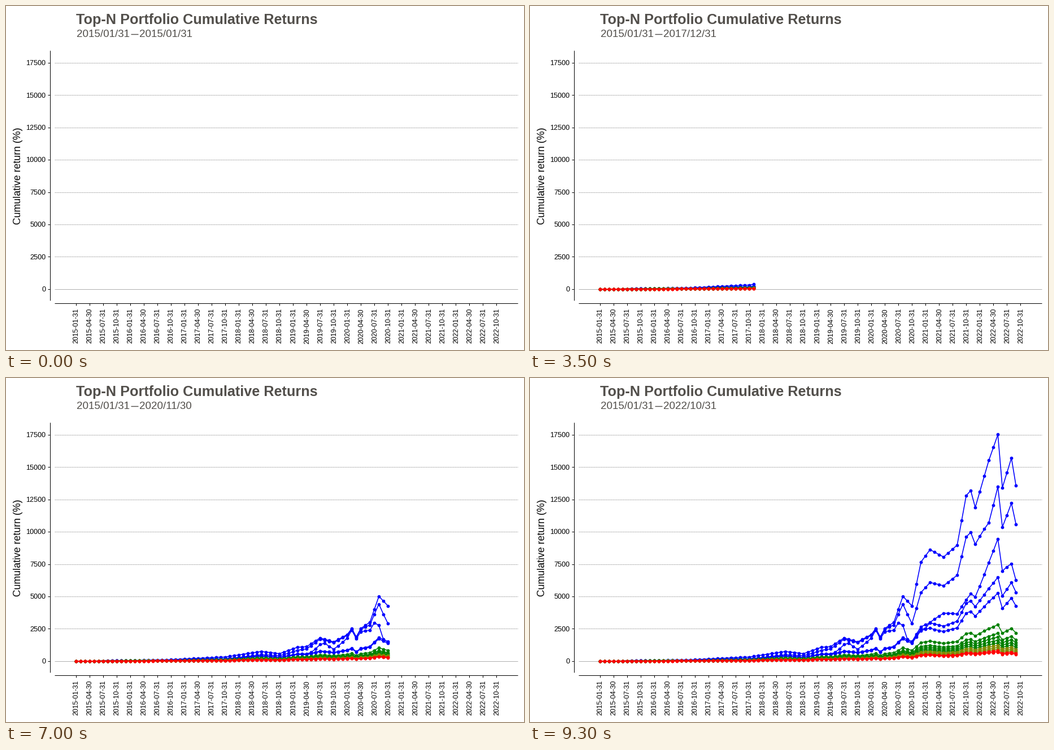
These frames come from a looping animation (917 px wide and 611 px high, 9.4 s). A matplotlib script:

```python
import numpy as np
import matplotlib.pyplot as plt
from matplotlib.animation import FuncAnimation

W, H, DPI = 917, 611, 64
PT = 72 / DPI  # points per pixel
MONTHS = 94
ZERO_Y = 502.75
UNIT = 57.4 / 2500  # pixels per percent
GREY = "#524f4b"

plt.rcParams["font.family"] = "Liberation Sans"

fig = plt.figure(figsize=(W / DPI, H / DPI), dpi=DPI, facecolor="white")
ax = fig.add_axes([0, 0, 1, 1])
ax.set_xlim(0, W)
ax.set_ylim(H, 0)
ax.axis("off")


def month_x(k):
    return 123.8 + 8.005 * k


def value_y(percent):
    return ZERO_Y - percent * UNIT


def month_end(k, sep):
    year, month = 2015 + k // 12, k % 12 + 1
    if month == 2:
        day = 29 if year % 4 == 0 else 28
    else:
        day = 30 if month in (4, 6, 9, 11) else 31
    return f"{year}{sep}{month:02d}{sep}{day}"


def stroke(x, y, color="black", width=1.0, **kw):
    return ax.plot(x, y, color=color, lw=width * PT,
                   solid_capstyle="butt", dash_capstyle="butt", **kw)[0]


def label(x, y, s, size, **kw):
    return ax.text(x, y, s, fontsize=size * PT, va="baseline",
                   rotation_mode="anchor", **kw)


def draw_axes():
    stroke([78, 78], [79, 523])
    stroke([86, 906], [528, 528])
    for value in range(0, 17501, 2500):
        y = value_y(value)
        style = {"dashes": (2, 1)} if value else {}
        stroke([86, 906], [y, y], "#a6a6a6" if value else "#b0b0b0", zorder=1, **style)
        stroke([74, 78], [y, y])
        label(70.3, y + 4.3, str(value), 12.6, ha="right")
    for k in range(0, MONTHS, 3):
        x = month_x(k)
        stroke([x, x], [528, 532])
        label(x + 3.9, 537, month_end(k, "-"), 12.3, ha="right", rotation=90)
    label(26.3, 302, "Cumulative return (%)", 17.7, ha="center", rotation=90)


def through(*points):
    """Straight segments through (month, value) turning points."""
    xs, ys = zip(*points)
    return np.interp(np.arange(MONTHS - 1), xs, ys)


def portfolio_returns():
    """Cumulative returns in percent, best portfolio first.

    Only the leader has its own path; the rest are shares of a better one.
    """
    first = through((0, -30), (20, 90), (33, 310), (41, 740), (45, 570),
                    (49, 1070), (51, 1110), (54, 1790), (57, 1480), (60, 2050),
                    (61, 2520), (62, 1870), (63, 2520), (65, 3000), (67, 5010),
                    (69, 4270), (71, 7660), (73, 8620), (76, 8050), (79, 8970),
                    (81, 12800), (82, 13190), (83, 11880), (86, 15520),
                    (88, 17520), (89, 13410), (91, 15710), (92, 13580))
    second = first * through((0, .8), (34, .58), (48, .75), (54, .95), (63, .98),
                             (67, .88), (69, .68), (77, .73), (83, .76),
                             (86, .69), (88, .77), (92, .78))
    third = first * through((0, .6), (52, .5), (55, .82), (57, .62), (61, .95),
                            (63, .9), (66, .74), (68, .36), (72, .31), (76, .46),
                            (81, .37), (88, .54), (92, .46))
    fourth = first * through((0, .6), (50, .5), (53, .43), (57, .455), (61, .4),
                             (69, .352), (76, .336), (87, .365), (92, .392))
    fifth = fourth * through((0, .95), (66, .95), (74, .85), (92, .8))
    sixth = fourth * through((0, .75), (60, .6), (77, .5), (92, .41))
    # The remaining portfolios fan out from the sixth as time passes.
    spread = through((0, .7), (60, .75), (92, 1))
    rest = [sixth * np.exp(-spread * gap) for gap in np.linspace(.28, 1.45, 9)]
    return [first, second, third, fourth, fifth, sixth, *rest]


draw_axes()
label(124.3, 31.6, "Top-N Portfolio Cumulative Returns", 25.2, weight="bold", color=GREY)
label(124.5, 55.3, month_end(0, "/"), 18.8, color=GREY)
stroke([221, 234], [50, 50], GREY, 1.4)
end_date = label(236, 55.3, "", 18.8, color=GREY)

xs = month_x(np.arange(MONTHS - 1))
colors = ["blue"] * 5 + ["green"] * 5 + ["#7f8c00"] * 3 + ["red"] * 2
curves = []
for rank, (returns, color) in enumerate(zip(portfolio_returns(), colors)):
    line = stroke([], [], color, 1.6, marker="o", ms=5.8 * PT, mew=0, zorder=3 + rank)
    curves.append((line, value_y(returns)))


def update(i):
    end_date.set_text(month_end(i, "/"))
    for line, ys in curves:
        line.set_data(xs[:i], ys[:i])
    return [end_date, *(line for line, _ in curves)]


anim = FuncAnimation(fig, update, frames=MONTHS, interval=100,
                     repeat=True, repeat_delay=0, blit=False)
plt.show()
```
